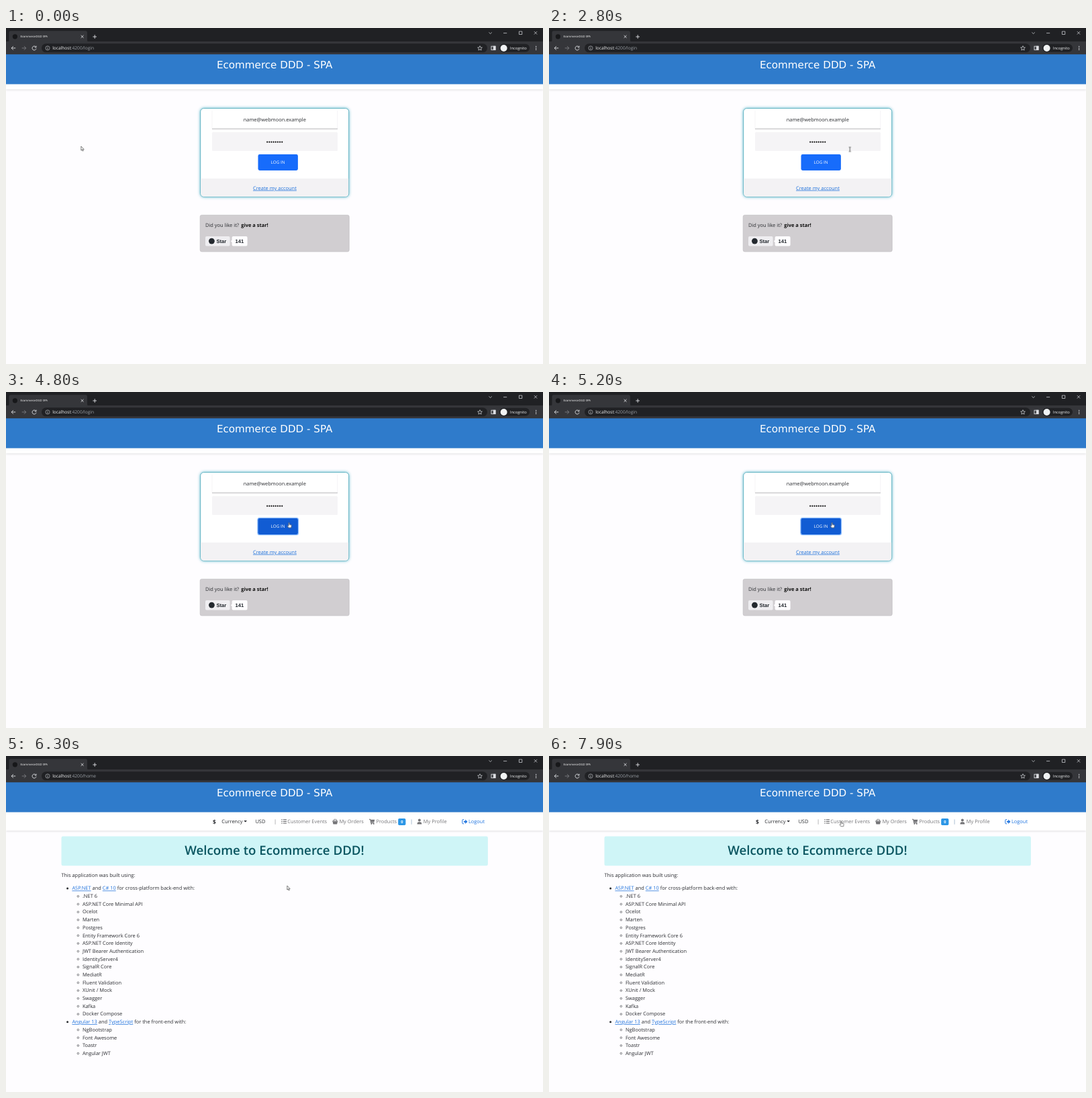
An HTML page that plays this animation: 800 by 500 pixels, repeating every 8 s.

```html
<!DOCTYPE html>
<html lang="en">
<head>
<meta charset="utf-8">
<title>Ecommerce DDD - SPA</title>
<style>
html, body { margin: 0; width: 100%; height: 100%; overflow: hidden; background: #fefdff; }
svg { display: block; }
text { font: 7.46px "Open Sans", "Noto Sans", sans-serif; fill: #2b2d31; text-rendering: geometricPrecision; white-space: pre; }
.mid { text-anchor: middle; }
.link { fill: #1f74e0; }
.under { fill: #2173dc; text-decoration: underline; }
.muted { fill: #77777a; }
.bold { font-weight: 700; }
.url { font-size: 6.6px; fill: #9aa0a6; }
.url tspan { fill: #f1f3f4; }
.title { font: 15.15px "DejaVu Sans", sans-serif; fill: #fff; }
.welcome { font-size: 18.7px; font-weight: 600; fill: #0a5560; }
.badge { font: 700 7.6px "Liberation Sans", sans-serif; fill: #24292f; }
.line { fill: none; stroke: #dfe1e5; stroke-width: .9; }
.strip { fill: #fff; filter: drop-shadow(0 1px 1.6px rgba(0,0,0,.12)); }
.pointer path { stroke-linejoin: round; }
</style>
</head>
<body>
<svg width="800" height="500" viewBox="0 0 800 500">
  <rect width="800" height="500" fill="#fefdff"/>

  <g id="login">
    <rect class="strip" y="80" width="800" height="11.3"/>
    <rect x="289.7" y="119.6" width="221" height="131.6" rx="5" fill="#fff" stroke="#57aebf" stroke-width=".9"
      style="filter:drop-shadow(0 0 2.2px #5fb9cc)"/>
    <path d="M290.2 224H510.2V246Q510.2 250.7 505.5 250.7H295Q290.2 250.7 290.2 246Z" fill="#f3f2f4"/>
    <path d="M307 123V150M493.7 123V150" stroke="#f1f0f2" stroke-width=".7"/>
    <path d="M307 150.1H494" stroke="#b5b4b8"/>
    <rect x="307" y="155" width="187" height="28" rx="1.5" fill="#f5f4f6"/>
    <text class="mid" x="400.3" y="138.8">name@webmoon.example</text>
    <g id="dots" fill="#111"></g>
    <rect id="ring" x="374.3" y="186.8" width="61.8" height="26.4" rx="3.5" fill="#8cbcfd"/>
    <rect id="button" x="375.5" y="188" width="59.4" height="24" rx="2.4"/>
    <text class="mid" x="405" y="202.3" style="font-size:6.3px;fill:#fff">LOG IN</text>
    <text class="mid under" x="400.4" y="240.6">Create my account</text>

    <rect x="289.2" y="278.4" width="222" height="54.4" rx="2.4" fill="#d1ced1" stroke="#bfbcc0" stroke-width=".7"/>
    <text x="297" y="295.9">Did you like it?</text>
    <text class="bold" x="350.2" y="295.9" style="fill:#111">give a star!</text>
    <rect x="297" y="310" width="36.6" height="14.5" rx="2" fill="#efeef1"/>
    <circle cx="306.4" cy="317.1" r="4.4" fill="#24292f"/>
    <text class="badge" x="313.4" y="319.8">Star</text>
    <path d="M338.5 310H357.6Q359.6 310 359.6 312V322.5Q359.6 324.5 357.6 324.5H338.5Q336.6 324.5 336.6 322.5V318.9L334.9 317.2L336.6 315.5V312Q336.6 310 338.5 310Z" fill="#fefdff"/>
    <text class="badge mid" x="347.8" y="319.8">141</text>
  </g>

  <g id="home">
    <rect class="strip" y="80" width="800" height="31"/>
    <text class="bold mid" x="310.3" y="100.6" style="font-size:8.4px">$</text>
    <text x="321.2" y="100.3">Currency</text>
    <path d="M354.3 95.9H359L356.65 98.5Z" fill="#2b2d31"/>
    <text x="371.4" y="100.3">USD</text>
    <text class="mid muted" x="401" y="100.3">|</text>
    <text class="muted" x="419.3" y="100.3">Customer Events</text>
    <text class="muted" x="496.4" y="100.3">My Orders</text>
    <text class="muted" x="551.4" y="100.3">Products</text>
    <rect x="584.2" y="93" width="11.2" height="10" rx="1.8" fill="#2b96e6"/>
    <text class="bold mid" x="589.8" y="100.2" style="font-size:5.7px;fill:#fff">0</text>
    <text class="mid" x="604" y="100.3" style="fill:#6487ad">|</text>
    <text class="muted" x="621.8" y="100.3">My Profile</text>
    <text class="link" x="688.9" y="100.3">Logout</text>
    <g fill="none" stroke="#737376" stroke-width="1.1">
      <path d="M410.2 94.9H411.7M410.2 97.6H411.7M410.2 100.3H411.7M412.8 94.9H418M412.8 97.6H418M412.8 100.3H418"/>
      <path d="M486 97H494.6M488 96.5L489.6 93.8M492.6 96.5L491 93.8"/>
      <path d="M541 94.3H542.6L543.8 99.6H548.4"/>
    </g>
    <g fill="#737376">
      <path d="M486.6 97.4H494L493.1 101.6H487.5Z"/>
      <path d="M543 94.8H549.3L548.4 98.4H543.7Z"/>
      <circle cx="544.4" cy="101" r=".9"/><circle cx="547.8" cy="101" r=".9"/>
      <circle cx="615.9" cy="95.6" r="2"/>
      <path d="M612.5 101.6Q612.5 98.3 615 98.3H616.8Q619.3 98.3 619.3 101.6Z"/>
    </g>
    <path d="M682 94.6H680.8Q679.8 94.6 679.8 95.6V99.8Q679.8 100.8 680.8 100.8H682" fill="none" stroke="#1f74e0"/>
    <path d="M682 96.7H684.2V94.4L687.5 97.7L684.2 101V98.8H682Z" fill="#1f74e0"/>

    <rect x="82.5" y="119.5" width="635.4" height="43.8" rx="2.4" fill="#cff5f7"/>
    <text class="welcome mid" x="400" y="147.2">Welcome to Ecommerce DDD!</text>
    <text x="82.4" y="179.5">This application was built using:</text>
    <g id="list"></g>
  </g>

  <rect y="39" width="800" height="44.6" fill="#2f7bcb"/>
  <text class="title mid" x="400.2" y="60.4">Ecommerce DDD - SPA</text>

  <rect width="800" height="20.5" fill="#202124"/>
  <rect y="20" width="800" height="19.2" fill="#35363a"/>
  <path d="M2 20.5Q4.5 20.5 4.5 18V7Q4.5 4.2 7.3 4.2H118.3Q121 4.2 121 7V18Q121 20.5 123.5 20.5Z" fill="#35363a"/>
  <circle cx="13.4" cy="12.8" r="3.6" fill="#17181a"/>
  <text x="21.5" y="14.3" style="font-size:4.2px;fill:#fff">EcommerceDGD SPA</text>
  <rect x="53" y="23.3" width="664" height="13" rx="6.5" fill="#202124"/>
  <rect x="735" y="23.8" width="45" height="12" rx="6" fill="#202124"/>
  <circle cx="741.6" cy="30" r="5" fill="#f1f3f4"/>
  <text x="750.8" y="32" style="font-size:5.75px;fill:#f1f3f4">Incognito</text>
  <g class="line">
    <path d="M111.7 10.9L115.5 14.7M115.5 10.9L111.7 14.7M129.4 13H135M132.2 10.2V15.8"/>
    <path d="M14.2 29.9H8.2M10.9 27.1L8.1 29.9L10.9 32.7"/>
    <path d="M23.7 29.9H29.7M27 27.1L29.8 29.9L27 32.7" stroke="#7d7f83"/>
    <path d="M44.4 28.1A3 3 0 1 0 45 30.6M45 26.6V28.8H42.8"/>
    <path d="M62 29.5V31.8M62 27.9V28.6" stroke-width=".7"/>
    <circle cx="62" cy="29.9" r="3.1" stroke-width=".7" stroke="#b5b8bd"/>
    <path d="M706 26.6L707 28.9L709.4 29.1L707.6 30.7L708.1 33.1L706 31.8L703.9 33.1L704.4 30.7L702.6 29.1L705 28.9Z" stroke-width=".7"/>
    <rect x="723" y="27.2" width="6" height="5.4"/>
    <rect x="726.2" y="27.2" width="2.8" height="5.4" fill="#dfe1e5"/>
    <path d="M719.4 6.5L721.6 8.6L723.8 6.5M741 7.6H746.2M764.4 5.1H768.8V9.5H764.4ZM786.8 5.1L791.2 9.5M791.2 5.1L786.8 9.5" stroke-width=".7"/>
  </g>
  <g fill="#dfe1e5"><circle cx="789.6" cy="27.5" r=".75"/><circle cx="789.6" cy="29.9" r=".75"/><circle cx="789.6" cy="32.3" r=".75"/></g>
  <text id="urlLogin" class="url" x="69.2" y="32.3"><tspan>localhost</tspan>:4200/login</text>
  <text id="urlHome" class="url" x="69.2" y="32.3"><tspan>localhost</tspan>:4200/home</text>

  <g id="pointer" class="pointer">
    <path id="arrow" d="M0 0V6.1L1.4 4.9L2.4 7.1L3.4 6.6L2.5 4.6H4.3Z" fill="#fff" stroke="#333" stroke-width=".65"/>
    <path id="beam" d="M-1.5 -3.2H-.4L0 -2.8L.4 -3.2H1.5M0 -2.8V2.8M-1.5 3.2H-.4L0 2.8L.4 3.2H1.5" fill="none" stroke="#333" stroke-width=".8"/>
    <path id="hand" d="M-.7 .5Q0 -.5 .7 .5V3L3.2 3.5Q3.9 3.7 3.8 4.6L3.2 7.8H-.6L-2.4 4.9Q-2 4.1 -.7 5Z" fill="#fff" stroke="#333" stroke-width=".6"/>
    <g id="busy" fill="none" stroke-width="1.6">
      <circle r="2.9" stroke="#2388d6"/>
      <path id="arc" d="M0 -2.9A2.9 2.9 0 0 1 2.9 0" stroke="#6fbcf0"/>
    </g>
  </g>
</svg>
<script>
const LOOP = 8000, SWITCH = 5300;
const $ = id => document.getElementById(id);

$('dots').innerHTML = Array.from({ length: 8 }, (_, i) =>
  `<circle cx="${389.2 + i * 3.15}" cy="169.7" r="1.1"/>`).join('');

const link = s => `<tspan class="under">${s}</tspan>`;
const sections = [
  [`${link('ASP.NET')} and ${link('C# 10')} for cross-platform back-end with:`,
    '.NET 6', 'ASP.NET Core Minimal API', 'Ocelot', 'Marten', 'Postgres', 'Entity Framework Core 6',
    'ASP.NET Core Identity', 'JWT Bearer Authentication', 'IdentityServer4', 'SignalR Core', 'MediatR',
    'Fluent Validation', 'XUnit / Mock', 'Swagger', 'Kafka', 'Docker Compose'],
  [`${link('Angular 13')} and ${link('TypeScript')} for the front-end with:`,
    'NgBootstrap', 'Font Awesome', 'Toastr', 'Angular JWT']
];
let base = 199.4;
$('list').innerHTML = sections.flatMap(rows => rows.map((row, i) => {
  const y = base;
  base += 11.69;
  const bullet = i
    ? `<circle cx="107.4" cy="${y - 2.3}" r="1.3" fill="none" stroke="#2b2d31" stroke-width=".6"/>`
    : `<circle cx="91.6" cy="${y - 2.3}" r="1.5" fill="#2b2d31"/>`;
  return `${bullet}<text x="${i ? 113.9 : 98.4}" y="${y}">${row}</text>`;
})).join('');

// Plays [ms, value] steps as hard changes of one property.
function track(id, prop, steps) {
  const frames = steps.map(([ms, value]) => ({ offset: ms / LOOP, [prop]: value, easing: 'step-end' }));
  frames.push({ offset: 1, [prop]: steps.at(-1)[1] });
  $(id).animate(frames, { duration: LOOP, iterations: Infinity });
}

for (const id of ['login', 'urlLogin']) track(id, 'opacity', [[0, 1], [SWITCH, 0]]);
for (const id of ['home', 'urlHome']) track(id, 'opacity', [[0, 0], [SWITCH, 1]]);
track('button', 'fill', [[0, '#176cfb'], [3400, '#1464e8'], [3800, '#115cd3']]);
track('ring', 'opacity', [[0, 0], [4700, .4], [4800, 1]]);

const moves = [
  [0, 'arrow', 111.8, 176], [100, 'arrow', 122, 179], [200, 'arrow', 138, 183], [300, 'arrow', 152, 187],
  [500, 'arrow', 164, 189], [700, 'arrow', 169.4, 190], [2800, 'beam', 448.3, 180.6],
  [3300, 'hand', 429, 191.5], [3400, 'hand', 421.6, 194.3], [SWITCH, 'busy', 424.5, 199],
  [5800, 'arrow', 421, 195], [6300, 'arrow', 418.8, 193], [6400, 'arrow', 417.5, 188],
  [6700, 'arrow', 424, 160], [6800, 'arrow', 431, 128], [6900, 'arrow', 434.5, 107],
  [7400, 'hand', 435.4, 97]
];
track('pointer', 'transform', moves.map(([ms, , x, y]) => [ms, `translate(${x}px, ${y}px)`]));
for (const kind of ['arrow', 'beam', 'hand', 'busy'])
  track(kind, 'opacity', moves.map(([ms, shown]) => [ms, shown === kind ? 1 : 0]));
track('arc', 'transform', [0, 1, 2, 3, 4, 5].map(i => [i && SWITCH + i * 100, `rotate(${i * 70}deg)`]));
</script>
</body>
</html>
```
